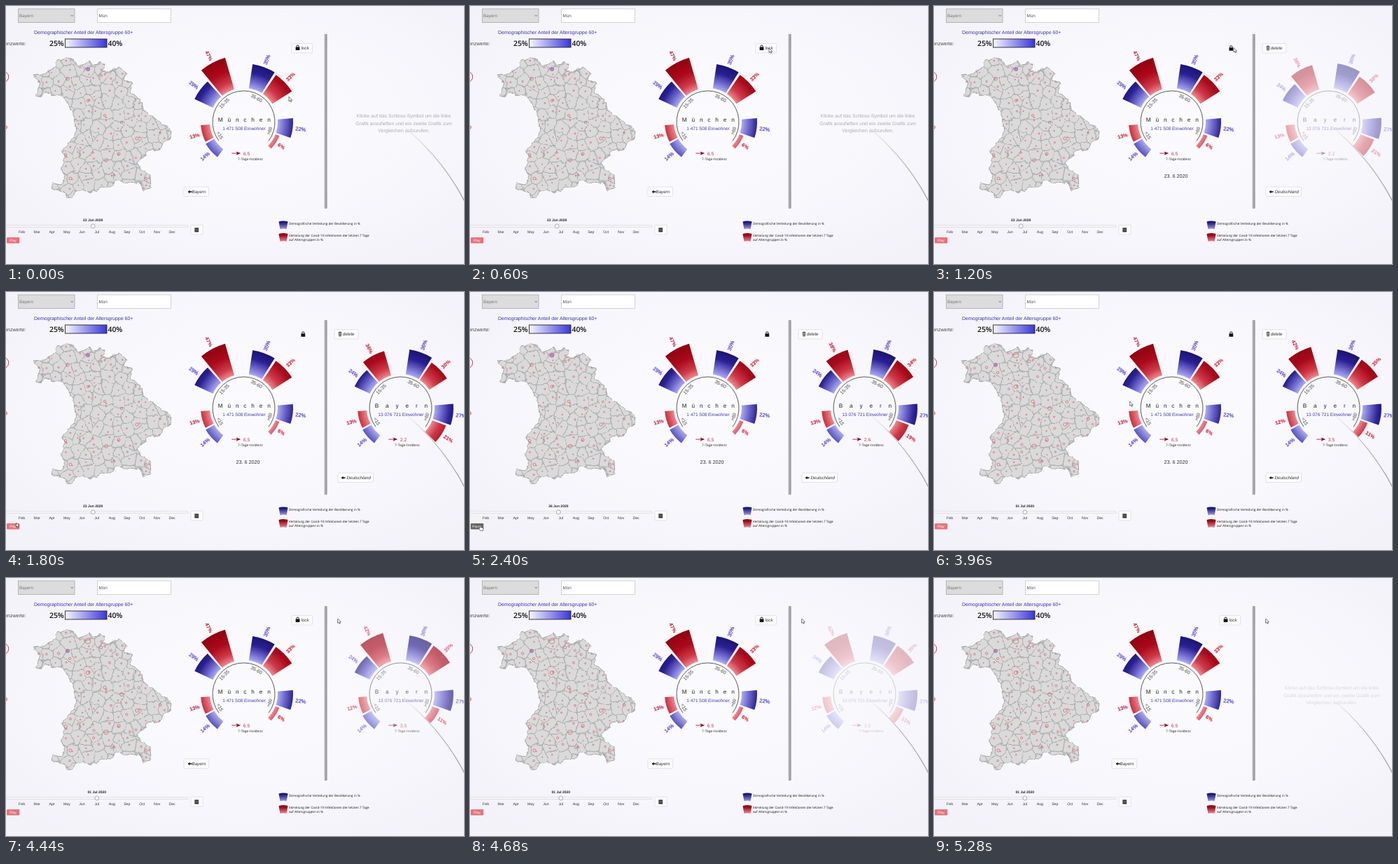
Recreate the animation shown at these times as an HTML page. Size 654 by 368 pixels, loop 5400 ms.

```html
<!DOCTYPE html>
<html lang="de">
<head>
<meta charset="utf-8">
<style>
html, body { margin: 0; width: 100%; height: 100%; overflow: hidden; background: #f6f5fb; }
svg { display: block; width: 100vw; height: 100vh; }
text { font-family: "Liberation Sans", Arial, sans-serif; text-rendering: geometricPrecision; }
.legend text { font-family: "Open Sans", sans-serif; font-size: 4.6px; fill: #111; }
.btn rect { fill: #fcfcff; stroke: #d8d8de; stroke-width: .7; }
.btn text { font-size: 6.2px; font-style: italic; fill: #333; }
</style>
</head>
<body>
<svg id="stage" viewBox="0 0 654 368">
  <defs>
    <radialGradient id="glow" cx="52%" cy="45%" r="65%">
      <stop offset="0" stop-color="#fbfbfe"/><stop offset=".6" stop-color="#f8f7fc"/><stop offset="1" stop-color="#f3f2f9"/>
    </radialGradient>
    <linearGradient id="scale"><stop offset="0" stop-color="#f8f8ff"/><stop offset="1" stop-color="#3a35df"/></linearGradient>
    <linearGradient id="arcFade" x1="540" y1="150" x2="654" y2="277" gradientUnits="userSpaceOnUse">
      <stop offset=".2" stop-color="#aaa" stop-opacity="0"/><stop offset=".6" stop-color="#aaa" stop-opacity=".8"/><stop offset="1" stop-color="#999"/>
    </linearGradient>
    <linearGradient id="wall"><stop offset="0" stop-color="#bbb" stop-opacity="0"/><stop offset=".45" stop-color="#aaa"/><stop offset="1" stop-color="#8f8f94"/></linearGradient>
    <radialGradient id="blue" gradientUnits="userSpaceOnUse" cx="0" cy="0" r="96">
      <stop offset=".49" stop-color="#b4b4f4"/><stop offset=".61" stop-color="#6f6ace"/><stop offset=".74" stop-color="#2a2092"/><stop offset=".86" stop-color="#1c1478"/>
    </radialGradient>
    <radialGradient id="red" gradientUnits="userSpaceOnUse" cx="0" cy="0" r="96">
      <stop offset=".49" stop-color="#f29098"/><stop offset=".62" stop-color="#cf3a48"/><stop offset=".79" stop-color="#aa0a1a"/><stop offset="1" stop-color="#920010"/>
    </radialGradient>
    <linearGradient id="keyBlue" x2="0" y2="1"><stop offset=".2" stop-color="#1f1680"/><stop offset="1" stop-color="#9a9aec"/></linearGradient>
    <linearGradient id="keyRed" x2="0" y2="1"><stop offset=".2" stop-color="#980012"/><stop offset="1" stop-color="#ee8890"/></linearGradient>
    <filter id="rough" x="-5%" y="-5%" width="110%" height="110%">
      <feTurbulence type="fractalNoise" baseFrequency=".11" numOctaves="2" seed="4"/>
      <feDisplacementMap in="SourceGraphic" scale="7" xChannelSelector="R" yChannelSelector="G"/>
    </filter>
    <clipPath id="land"><path id="landClip"/></clipPath>
    <g id="lockIcon"><rect x="-2.9" y="-.9" width="5.8" height="4.5" rx=".6" fill="#111"/><path d="M-1.7 -.8V-1.7A1.7 1.7 0 0 1 1.7 -1.7V-.8" fill="none" stroke="#111" stroke-width="1"/></g>
    <g id="backIcon"><path d="M-3 0L0 -2.3V-.8H3V.8H0V2.3Z" fill="#111"/></g>
  </defs>
  <rect width="654" height="368" fill="url(#glow)"/>
  <path d="M540 150Q618 206 655 279" fill="none" stroke="url(#arcFade)" stroke-width="1.2"/>
  <rect x="453.5" y="40" width="5" height="249" rx="1" fill="url(#wall)"/>

  <rect x="17.5" y="4" width="80.5" height="19.5" fill="#dcdcdd" stroke="#a8a8a8" stroke-width=".8"/>
  <text x="19" y="16" font-size="6.3" fill="#777">Bayern</text>
  <path d="M92.6 12.8L94.3 14.6L96 12.8" fill="none" stroke="#555" stroke-width=".8"/>
  <rect x="130.5" y="4" width="105" height="19.5" fill="#fff" stroke="#c8c8cc" stroke-width=".8"/>
  <text x="132.5" y="16" font-size="6.3" fill="#555">Mün</text>
  <text x="40" y="40" font-size="7" fill="#3a32ae">Demographischer Anteil der Altersgruppe 60+</text>
  <text x="28.5" y="56" font-size="7" fill="#444" text-anchor="end">Inzidenzwerte:</text>
  <g font-size="10.4" font-weight="600" fill="#111">
    <text x="62" y="56.7" style="font-family:'Open Sans',sans-serif">25%</text>
    <text x="145.5" y="56.7" style="font-family:'Open Sans',sans-serif">40%</text>
  </g>
  <rect x="84.5" y="47" width="59.5" height="12" fill="url(#scale)" stroke="#222" stroke-width=".9"/>
  <g fill="none" stroke="#dc3c4c"><circle cx="-4" cy="101" r="7.8"/><circle cx="-1" cy="173" r="2.4"/></g>

  <g id="map"></g>

  <rect x="-4" y="312.9" width="264" height="2.4" rx="1" fill="#fff" stroke="#c4c4c8" stroke-width=".6"/>
  <g id="months" font-size="5.2" fill="#333" text-anchor="middle"></g>
  <g id="knob">
    <circle cy="314" r="2.9" fill="#fff" stroke="#888" stroke-width=".7"/>
    <text id="day" y="306.8" font-size="5" font-weight="bold" fill="#222" text-anchor="middle"></text>
  </g>
  <g class="btn"><rect x="264" y="312.3" width="17" height="13.5" rx="1"/>
    <path d="M269.3 316.4h5.8v6h-5.8z" fill="#222"/><path d="M269.3 318.3h5.8M269.3 320.3h5.8" stroke="#ddd" stroke-width=".5"/></g>
  <rect id="playBox" x="1" y="330" width="18.3" height="8.5" rx="1.2"/>
  <text id="playText" x="10" y="336" font-size="4.8" fill="#fff" text-anchor="middle"></text>

  <g class="legend">
    <path d="M389.5 307.5Q396 305.4 402.5 307.5L400.6 318.2Q396 316.8 391.4 318.2Z" fill="url(#keyBlue)"/>
    <path d="M389.5 325Q396 322.9 402.5 325L400.6 335.9Q396 334.5 391.4 335.9Z" fill="url(#keyRed)"/>
    <text x="404" y="311.6">Demografische Verteilung der Bevölkerung in %</text>
    <text x="404" y="329.2">Verteilung der Covid-19 Infektionen der letzten 7 Tage</text>
    <text x="404" y="335.4">auf Altersgruppen in %</text>
  </g>

  <g id="city" transform="translate(339.5 165.5)"></g>
  <g id="state" transform="translate(563.5 165.5)"></g>

  <g id="hint" font-size="7" fill="#acacb0" text-anchor="middle">
    <text x="568" y="159.3">Klicke auf das Schloss-Symbol um die linke</text>
    <text x="568" y="169.7">Grafik anzuheften und ein zweite Grafik zum</text>
    <text x="568" y="180">Vergleichen aufzurufen.</text>
  </g>

  <g id="open" class="btn">
    <rect x="408" y="53.5" width="29.5" height="13.5" rx="1"/>
    <use href="#lockIcon" x="416.5" y="59.5"/><text x="421.5" y="62.3">lock</text>
    <rect x="254" y="258" width="35.5" height="13.5" rx="1"/>
    <use href="#backIcon" x="262.5" y="265"/><text x="265.5" y="267">Bayern</text>
  </g>
  <g id="pinned" class="btn">
    <use href="#lockIcon" x="424.3" y="60.2"/>
    <text x="345.5" y="244.5" style="font-size:7.2px;font-style:normal" text-anchor="middle">23. 6 2020</text>
    <rect x="469" y="53.5" width="34" height="13.5" rx="1"/>
    <path d="M474.6 57.6h4.8M476 56.9h2M475.1 58.4l.4 4.6h3l.4-4.6zM476.4 59.3v3M477.6 59.3v3" fill="none" stroke="#333" stroke-width=".7"/>
    <text x="480.7" y="62.2">delete</text>
    <rect x="474" y="258" width="50.5" height="13.5" rx="1"/>
    <use href="#backIcon" x="481.5" y="265"/><text x="486.5" y="267">Deutschland</text>
  </g>

  <g id="cursor">
    <path id="arrow" d="M0 0V6.4L1.5 5.1L2.6 7.4L3.6 6.9L2.6 4.8H4.6Z" fill="#fff" stroke="#222" stroke-width=".6"/>
    <path id="hand" d="M0 0Q.7 -.9 1.4 0V2.7L4.4 3.2Q5.2 3.4 5 4.4L4.4 7.4H.6L-1.5 4.4Q-1.3 3.3 0 4Z" fill="#fff" stroke="#222" stroke-width=".6"/>
  </g>
</svg>
<script>
const LOOP = 5400, STEP = 120;
const $ = id => document.getElementById(id);
const clamp = (v, a = 0, b = 1) => Math.min(b, Math.max(a, v));

function el(parent, tag, attrs = {}, text) {
  const node = document.createElementNS('http://www.w3.org/2000/svg', tag);
  for (const k in attrs) node.setAttribute(k, attrs[k]);
  if (text !== undefined) node.textContent = text;
  parent.appendChild(node);
  return node;
}

let seed = 11;
const rand = () => (seed = seed * 16807 % 2147483647) / 2147483647;

// Map: outline, districts and incidence rings
const outline = [[39,98],[55,97],[64,91],[71,85],[70,79],[80,78],[87,73],[97,77],[103,86],[113,83],[119,78],
  [127,86],[134,79],[141,84],[139,92],[147,95],[155,90],[163,88],[173,97],[168,106],[180,110],[178,122],
  [194,138],[196,148],[215,162],[236,178],[235,188],[226,195],[221,204],[200,207],[199,214],[188,221],
  [191,232],[205,241],[206,260],[196,262],[190,251],[168,252],[158,250],[148,259],[136,258],[119,268],
  [111,262],[100,264],[96,272],[88,275],[84,266],[64,259],[66,253],[79,255],[84,248],[80,234],[83,220],
  [80,206],[98,186],[100,172],[95,154],[89,140],[81,127],[66,127],[55,121],[50,131],[42,128],[49,110]];
const toPath = pts => 'M' + pts.map(p => p.map(v => v.toFixed(1))).join('L') + 'Z';

function inside([x, y]) {
  let hit = false;
  outline.forEach(([ax, ay], i) => {
    const [bx, by] = outline[(i + 1) % outline.length];
    if (ay > y !== by > y && x < (bx - ax) * (y - ay) / (by - ay) + ax) hit = !hit;
  });
  return hit;
}

// Keeps the part of a polygon that lies nearer to p than to q
function cut(poly, p, q) {
  const side = v => (v[0] - (p[0] + q[0]) / 2) * (q[0] - p[0]) + (v[1] - (p[1] + q[1]) / 2) * (q[1] - p[1]);
  const out = [];
  poly.forEach((a, i) => {
    const b = poly[(i + 1) % poly.length], sa = side(a), sb = side(b);
    if (sa <= 0) out.push(a);
    if (sa < 0 !== sb < 0) {
      const k = sa / (sa - sb);
      out.push([a[0] + (b[0] - a[0]) * k, a[1] + (b[1] - a[1]) * k]);
    }
  });
  return out;
}

const sites = [];
for (let y = 72; y < 284; y += 15)
  for (let x = 34; x < 245; x += 15) sites.push([x + rand() * 13, y + rand() * 13]);

const shape = toPath(outline);
$('landClip').setAttribute('d', shape);
const land = el($('map'), 'g', { filter: 'url(#rough)', stroke: '#9c9c9c', 'stroke-width': .55 });
el(land, 'path', { d: shape, fill: '#dadada', 'stroke-width': .9 });
const cells = el(land, 'g', { 'clip-path': 'url(#land)', fill: 'none' });
for (const p of sites) {
  let poly = [[-30, -30], [30, -30], [30, 30], [-30, 30]].map(([x, y]) => [p[0] + x, p[1] + y]);
  for (const q of sites)
    if (q !== p && Math.hypot(q[0] - p[0], q[1] - p[1]) < 50) poly = cut(poly, p, q);
  el(cells, 'path', { d: toPath(poly) });
}

const towns = [[117,90,2.6],[88,104,2.2],[143,220,2.4],[161,211,2],[92,246,2],[85,212,1.7],[200,246,1.6],
  [187,189,2.2],[141,156,1.6],[117,135,1.7],[220,181,1.3],[124,209,1.3],[47,108,1.3],[136,99,1.5],[165,166,1.7]];
const rings = [...towns, ...sites.filter(inside).map(([x, y]) => [x, y, .4 + rand() * .8])].map(([x, y, r]) => ({
  r, grow: rand() * .7 - .1,
  node: el($('map'), 'circle', { cx: x, cy: y, fill: 'none', stroke: '#d8485a', 'stroke-width': .6 })
}));

'Feb Mar Apr May Jun Jul Aug Sep Oct Nov Dec'.split(' ')
  .forEach((m, i) => el($('months'), 'text', { x: 22.6 + i * 21.45, y: 323.6 }, m));

// Ring charts: angles in degrees clockwise from the top
const INNER = 48.5, WIDTH = 23.2;
const starts = [-143, -65, 8.7, 85.5];
const polar = (a, r) => {
  const t = a * Math.PI / 180;
  return (Math.sin(t) * r).toFixed(2) + ' ' + (-Math.cos(t) * r).toFixed(2);
};

function makeBar(g, start, hue, color) {
  const mid = start + WIDTH / 2, left = mid < 0;
  const path = el(g, 'path', { fill: `url(#${hue})` });
  const label = el(g, 'text', { 'font-size': 7.4, fill: color, 'text-anchor': left ? 'end' : 'start', y: 2.6 });
  if (hue === 'red') label.setAttribute('font-weight', 'bold');
  else { label.setAttribute('stroke', color); label.setAttribute('stroke-width', .22); }
  return value => {
    const r = INNER + value, end = start + WIDTH;
    path.setAttribute('d', `M${polar(start, INNER)}A${INNER} ${INNER} 0 0 1 ${polar(end, INNER)}L${polar(end, r)}A${r} ${r} 0 0 0 ${polar(start, r)}Z`);
    label.setAttribute('transform', `translate(${polar(mid, r + 4)}) rotate(${left ? mid + 90 : mid - 90})`);
    label.textContent = Math.round(value) + '%';
  };
}

function makeChart(g, name, spacing, people, blues) {
  el(g, 'path', { d: `M${polar(-127, 44.5)}A44.5 44.5 0 1 1 ${polar(127, 44.5)}`, fill: 'none', stroke: '#333', 'stroke-width': .8 });
  [['<15', -119, 61], ['15-35', -46, -46], ['35-60', 28, 28], ['>60', 109, -71]].forEach(([s, a, turn]) =>
    el(g, 'text', { transform: `translate(${polar(a, 38.8)}) rotate(${turn})`, y: 2.4, 'font-size': 6.8, fill: '#444', 'text-anchor': 'middle' }, s));
  el(g, 'text', { x: -36.8, y: -.4, 'font-size': 8.2, fill: '#222', 'letter-spacing': spacing }, name);
  el(g, 'text', { x: .5, y: 11.8, 'font-size': 6.5, fill: '#4237b4', 'text-anchor': 'middle' }, people + ' Einwohner');
  el(g, 'path', { d: 'M-17.3 44.6H-9.5', stroke: '#7a1420', 'stroke-width': .8 });
  el(g, 'path', { d: 'M-11 42L-4.3 44.6L-11 47.2L-9.4 44.6Z', fill: '#7a1420' });
  const rate = el(g, 'text', { x: -.8, y: 47.2, 'font-size': 6.9, fill: '#c04450' });
  el(g, 'text', { x: -8.4, y: 54.3, 'font-size': 5, fill: '#333' }, '7-Tage-Inzidenz');
  starts.forEach((a, i) => makeBar(g, a, 'blue', '#5340d4')(blues[i]));
  const reds = starts.map(a => makeBar(g, a + 25.6, 'red', '#cc1228'));
  return (values, incidence) => {
    reds.forEach((set, i) => set(values[i]));
    rate.textContent = incidence.toFixed(1);
  };
}

makeChart($('city'), 'München', 6.9, '1 471 508', [14, 29, 35, 22])([13, 47, 33, 6], 6.5);
const setState = makeChart($('state'), 'Bayern', 9.9, '13 076 721', [14, 24, 36, 27]);

// Days since 23 June, shares per age group, incidence
const series = [[0, 13, 36, 30, 21, 2.2], [3, 13, 38, 34, 19, 2.6], [7, 12, 41, 35, 12, 3.5], [8, 12, 42, 35, 11, 3.5]];
const path = [[0, 404, 129.5], [600, 427, 60], [1200, 428, 59.5], [1800, 14.5, 329], [1920, 14, 333],
  [3600, 14, 333], [4200, 424, 60], [4440, 473.7, 58], [5400, 473.7, 58]];

// Interpolates rows of [key, ...values]
function sample(rows, key, ease = k => k) {
  const i = Math.max(1, rows.findIndex(r => r[0] >= key));
  const a = rows[i - 1], b = rows[i], k = ease(clamp((key - a[0]) / (b[0] - a[0])));
  return a.slice(1).map((v, j) => v + (b[j + 1] - v) * k);
}
const smooth = k => k * k * (3 - 2 * k);
const show = (id, on) => $(id).style.display = on ? '' : 'none';

function draw(t) {
  const day = clamp(Math.floor((t - 1830) / 180), 0, 8);
  const locked = t >= 960 && t < 4230, playing = t >= 1860 && t < 3600;

  $('knob').setAttribute('transform', `translate(${124.2 + day * .7})`);
  $('day').textContent = day < 8 ? `${23 + day} Jun 2020` : '01 Jul 2020';
  rings.forEach(({ r, grow, node }) => node.setAttribute('r', r * (1 + grow * day / 8)));
  rings[0].node.setAttribute('fill', day < 5 ? '#a58cd8' : 'none');
  rings[1].node.setAttribute('fill', day < 5 ? 'none' : '#a58cd8');

  const row = sample(series, day);
  setState(row.slice(0, 4), row[4]);
  $('state').style.opacity = t < 4230 ? clamp((t - 950) / 600) : clamp(1 - (t - 4230) / 600);
  $('hint').style.opacity = t < 960 ? 1 : clamp((t - 4950) / 800);
  show('open', !locked);
  show('pinned', locked);

  $('playBox').setAttribute('fill', playing ? '#666' : '#e8727e');
  $('playText').textContent = playing ? 'Pause' : 'Play';
  const [x, y] = sample(path, t, smooth);
  $('cursor').setAttribute('transform', `translate(${x} ${y})`);
  show('arrow', !playing);
  show('hand', playing);
}

let last = -1;
const origin = performance.now();
function tick() {
  const t = Math.floor((performance.now() - origin) % LOOP / STEP) * STEP;
  if (t !== last) draw(last = t);
  requestAnimationFrame(tick);
}
tick();
</script>
</body>
</html>
```
